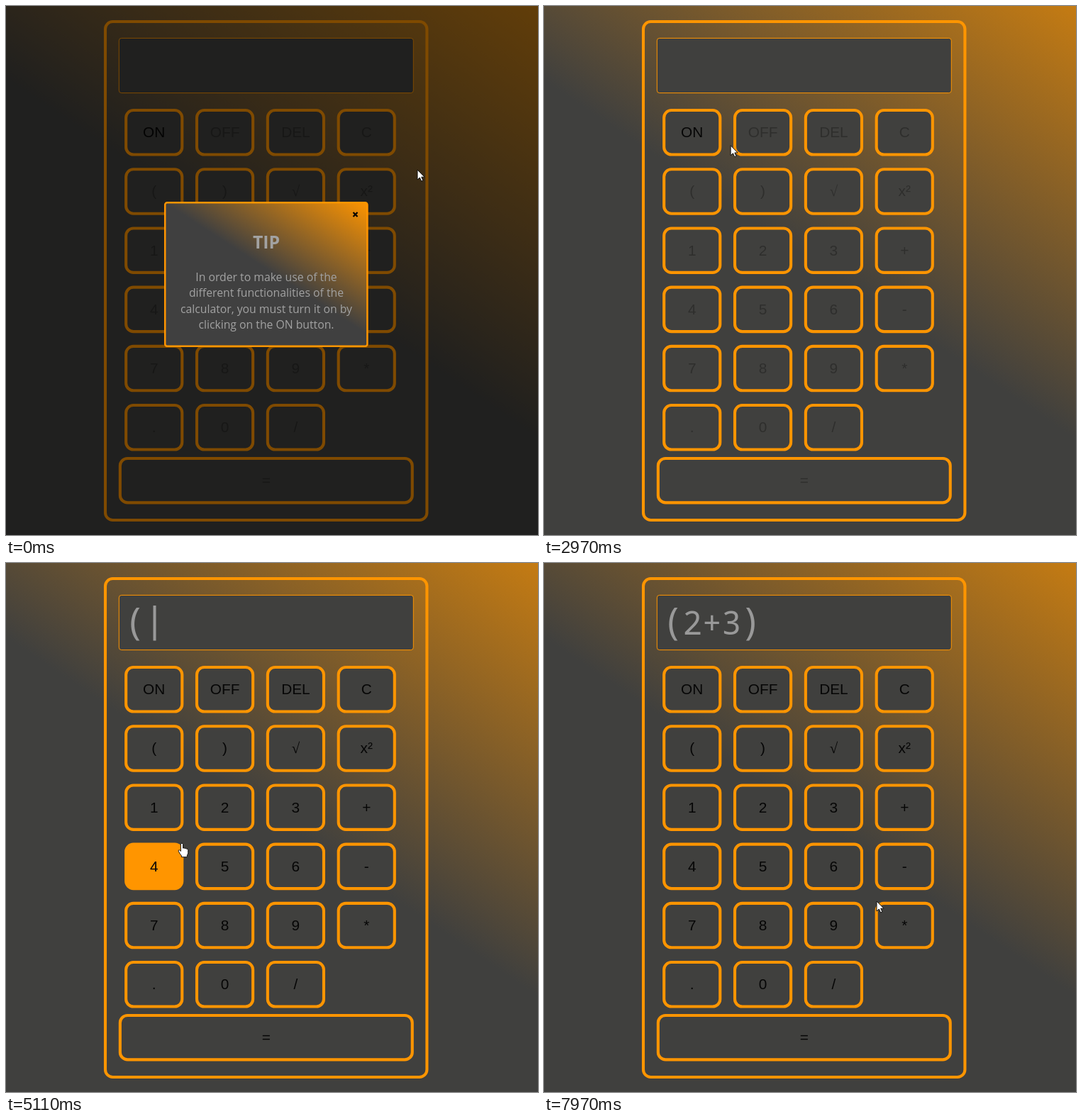
Animation, 750 px wide and 746 px high, one loop 8000 ms. Source, as an HTML page:

```html
<!DOCTYPE html>
<html lang="en">
<head>
<meta charset="utf-8">
<title>Calculator</title>
<style>
html, body { margin: 0; width: 100%; height: 100%; overflow: hidden; background: #40403e; }
svg { display: block; width: 100vw; height: 100vh; }
.box { fill: #40403e; stroke: #ff9500; stroke-width: 4.1; }
.frame { fill: none; }
.label { font: 20.8px "Liberation Sans", Arial, sans-serif; text-anchor: middle; fill: #060606; }
.root { font-family: "Liberation Serif", serif; }
.digit { font: 45.8px "Noto Sans Mono", monospace; text-anchor: middle; fill: #999; }
.paren { font-size: 52px; }
.tip { font: 15.75px "Open Sans", sans-serif; text-anchor: middle; fill: #a2a2a2; }
.title { font-size: 24.8px; font-weight: 700; }
.pointer { fill: #fff; stroke: #111; stroke-width: 1; stroke-linejoin: round; }
</style>
</head>
<body>
<svg viewBox="0 0 750 746" preserveAspectRatio="none">
  <defs>
    <linearGradient id="page" gradientUnits="userSpaceOnUse" x1="85" y1="803" x2="665" y2="-57">
      <stop offset=".512" stop-color="#40403e"/><stop offset="1" stop-color="#c47b13"/>
    </linearGradient>
    <linearGradient id="card" gradientUnits="userSpaceOnUse" x1="277.5" y1="516.4" x2="456.5" y2="240.6">
      <stop offset=".52" stop-color="#404040"/><stop offset="1" stop-color="#ff9500"/>
    </linearGradient>
  </defs>
  <rect width="750" height="746" fill="url(#page)"/>
  <rect class="box frame" x="140" y="22" width="453.4" height="703" rx="10.5"/>
  <rect x="159.3" y="45.4" width="415" height="77.2" rx="3.5" fill="#40403e" stroke="#ff9500"/>
  <g id="screen"></g>
  <rect id="caret" y="60" width="4" height="49.5" fill="#999"/>
  <g id="keys"></g>
  <g id="modal">
    <rect width="750" height="746" opacity=".5"/>
    <rect x="224.2" y="277.2" width="285.2" height="202.6" rx="3" fill="url(#card)" stroke="#ff9500" stroke-width="2.5"/>
    <path d="M489.5 291l6 6m0-6l-6 6" stroke="#000" stroke-width="2.2"/>
    <text class="tip title" x="367" y="342">TIP</text>
    <text class="tip" x="367" y="388">In order to make use of the</text>
    <text class="tip" x="367" y="410.4">different functionalities of the</text>
    <text class="tip" x="367" y="432.8">calculator, you must turn it on by</text>
    <text class="tip" x="367" y="455.2">clicking on the ON button.</text>
  </g>
  <path id="arrow" class="pointer" d="M0 0V14L3.3 11L5.6 16L7.9 15L5.7 10.2H10Z"/>
  <path id="hand" class="pointer" d="M-1.6 1.2Q0-1.2 1.6 1.2V7Q3.2 5.8 4.2 7.4Q5.8 6.4 6.6 8.1Q8.6 7.4 8.8 9.6V13.5Q8.6 15.5 7.4 17V19.5H-.6V17.6Q-2.6 15.5-4.6 11.6Q-5.4 9.4-3.4 9.6L-1.6 11.4Z"/>
</svg>
<script>
const LOOP = 8000, CLOSED = 2060, HOVER_FROM = 2130, POWER = 3440;
const SCALE = 0.832, KEY_W = 100 * SCALE, KEY_H = 80 * SCALE, GAP = 20 * SCALE;
const LEFT = 158.8, TOP = 145, BORDER = 4.1, ADVANCE = 27.5;
const BLINK = 662, BLINK_PEAK = 5730;
const $ = id => document.getElementById(id);

// Pointer stops: arrival, position, rest, and the character clicked at the end of the rest
const stops = [
  [0, 580, 231, 370],
  [1000, 403, 419],
  [1500, 512, 345],
  [1900, 492, 293, 510],
  [3100, 240, 187, 340],
  [3810, 273, 178],
  [4300, 294, 291],
  [4550, 228, 282, 200, "("],
  [5070, 242, 392],
  [5400, 300, 368, 60, "2"],
  [5730, 524, 381],
  [5900, 522, 369, 120, "+"],
  [6380, 400, 340, 70, "3"],
  [6930, 318, 276, 400, ")"],
  [7970, 469, 477, 30]
].map(([at, x, y, rest = 0, char]) => ({ at, x, y, rest, char, leave: at + rest }));

function add(parent, tag, attrs, text = "") {
  const el = document.createElementNS("http://www.w3.org/2000/svg", tag);
  for (const name in attrs) el.setAttribute(name, attrs[name]);
  el.textContent = text;
  parent.append(el);
  return el;
}

function makeKey(text, x, y, w) {
  const rect = add($("keys"), "rect", {
    class: "box", x: x + BORDER / 2, y: y + BORDER / 2, width: w - BORDER, height: KEY_H - BORDER, rx: 10.5
  });
  const label = add($("keys"), "text", {
    class: text === "√" ? "label root" : "label", x: x + w / 2, y: y + KEY_H / 2 + 7
  }, text);
  return { text, x, y, w, rect, label };
}

const keys = "ON OFF DEL C ( ) √ x² 1 2 3 + 4 5 6 - 7 8 9 * . 0 /".split(" ").map((text, i) =>
  makeKey(text, LEFT + GAP / 2 + (KEY_W + GAP) * (i % 4), TOP + (KEY_H + GAP) * Math.floor(i / 4), KEY_W));
keys.push(makeKey("=", LEFT, TOP + 6 * KEY_H + 5.5 * GAP, 5 * KEY_W));

const digits = stops.filter(s => s.char).map((s, i) => ({
  at: s.leave,
  el: add($("screen"), "text", {
    class: "()".includes(s.char) ? "digit paren" : "digit", x: 181.7 + ADVANCE * i, y: 101
  }, s.char)
}));

// Velocity through a stop, zero where the pointer rests
function velocity(i, axis) {
  const a = stops[i - 1], b = stops[i], c = stops[i + 1];
  return !a || !c || b.rest ? 0 : (c[axis] - a[axis]) / (c.at - a.leave);
}

function pointerAt(t) {
  const i = Math.max(0, stops.findLastIndex(s => s.at <= t));
  const a = stops[i], b = stops[i + 1];
  if (!b || t <= a.leave) return [a.x, a.y];
  const d = b.at - a.leave, u = (t - a.leave) / d, v = 1 - u;
  return ["x", "y"].map(k =>
    a[k] * (1 + 2 * u) * v * v + b[k] * u * u * (3 - 2 * u) +
    d * u * v * (velocity(i, k) * v - velocity(i + 1, k) * u));
}

function caretAt(t) {
  const wave = 0.5 + 0.75 * Math.cos(2 * Math.PI * (t - BLINK_PEAK) / BLINK);
  return t < POWER ? 0 : Math.min(1, Math.max(0, wave));
}

function show(el, on) {
  el.setAttribute("visibility", on ? "visible" : "hidden");
}

function render(t) {
  const [x, y] = pointerAt(t);
  const open = t < CLOSED;
  let over = open && Math.abs(x - 492.5) < 6 && Math.abs(y - 294) < 7;

  for (const k of keys) {
    const hit = t >= HOVER_FROM && x >= k.x && x <= k.x + k.w && y >= k.y && y <= k.y + KEY_H;
    over = over || hit;
    k.rect.style.fill = hit ? "#ff9500" : "";
    k.label.setAttribute("opacity", t >= POWER || k.text === "ON" ? 1 : 0.3);
  }

  show($("modal"), open);
  show($("arrow"), !over);
  show($("hand"), over);
  for (const id of ["arrow", "hand"]) $(id).setAttribute("transform", `translate(${x} ${y})`);

  for (const d of digits) show(d.el, t >= d.at);
  const count = digits.filter(d => t >= d.at).length;
  $("caret").setAttribute("x", 180 + ADVANCE * count);
  $("caret").setAttribute("opacity", caretAt(t));
}

function tick() {
  render(performance.now() % LOOP);
  requestAnimationFrame(tick);
}
tick();
</script>
</body>
</html>
```
